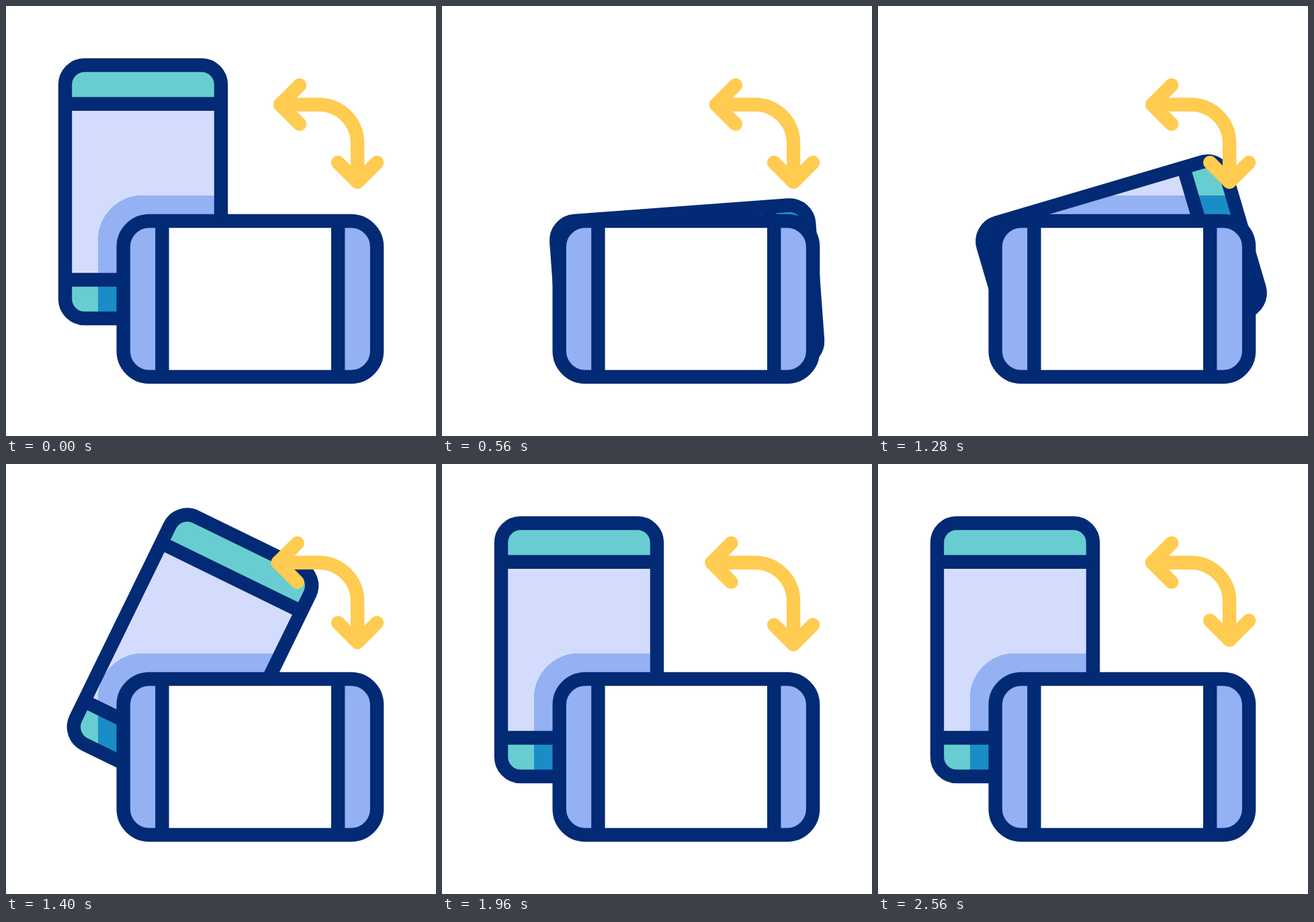
Recreate the animation shown at these times as an HTML page with a canvas. Size 640 px wide and 640 px high, loop 2.8 s.

```html
<!DOCTYPE html>
<html lang="en">
<head>
<meta charset="utf-8">
<title>Rotating phone</title>
<style>
  html, body { margin: 0; width: 100%; height: 100%; overflow: hidden; background: #fff; }
  canvas { display: block; width: 100vw; height: 100vh; }
</style>
</head>
<body>
<canvas id="stage" width="640" height="640"></canvas>
<script>
const ctx = document.getElementById('stage').getContext('2d');
const LOOP = 2800, STEP = 40, LINE = 20.4;
const NAVY = '#022a75', TEAL = '#68cdd1', DEEP = '#1b8dc6';
const SCREEN = '#d3dcfd', SHADE = '#94b1f4', YELLOW = '#ffcb50';

const clamp = v => Math.min(1, Math.max(0, v));
const smooth = s => s * s * (3 - 2 * s);
const mix = (a, b, k) => a + (b - a) * k;

// Steep ease in and out: cubic bezier (.75, 0, .25, 1)
function steep(s) {
  if (s <= 0 || s >= 1) return clamp(s);
  let lo = 0, hi = 1;
  for (let i = 0; i < 24; i++) {
    const u = (lo + hi) / 2, v = 1 - u;
    const x = 2.25 * u * v * v + 0.75 * u * u * v + u * u * u;
    if (x < s) lo = u; else hi = u;
  }
  return smooth(lo);
}

// 0 = upright, 1 = lying down
const turn = t => steep((t - 40) / 680) - steep((t - 1018) / 680);

// How far the arrow heads reach outwards, with a small rebound
function reach(t) {
  const keys = [0, 24, -6.7, 0], start = 1300, span = 427;
  const p = (t - start) / span;
  if (p <= 0 || p >= 3) return 0;
  const i = Math.floor(p);
  return mix(keys[i], keys[i + 1], smooth(p - i));
}

function roundBox(x, y, w, h, r) {
  ctx.beginPath();
  ctx.roundRect(x, y, w, h, r);
}

function line(...pts) {
  ctx.beginPath();
  pts.forEach(([x, y], i) => i ? ctx.lineTo(x, y) : ctx.moveTo(x, y));
  ctx.stroke();
}

function pose(k) {
  const swing = k * 105.77 * Math.PI / 180;
  const c = Math.cos(swing), s = Math.sin(swing);
  const dx = -19.4, dy = -140.1;
  ctx.translate(223.4 + dx * c - dy * s, 416.6 + dx * s + dy * c);
  ctx.rotate(k * Math.PI / 2);
}

function fillPhone(ends, middle) {
  ctx.fillStyle = ends;
  roundBox(-116, -188.5, 232, 377, 29);
  ctx.fill();
  ctx.fillStyle = middle;
  ctx.fillRect(-116, -130.5, 232, 261.5);
}

function backPhone(k) {
  ctx.save();
  pose(k);
  fillPhone(TEAL, SCREEN);
  ctx.restore();

  // The shade stays still while the phone turns beneath it
  ctx.save();
  roundBox(137, 282, 453, 308, 67);
  ctx.clip();
  pose(k);
  fillPhone(DEEP, SHADE);
  ctx.restore();

  ctx.save();
  pose(k);
  roundBox(-116, -188.5, 232, 377, 29);
  ctx.stroke();
  line([-116, -130.8], [116, -130.8]);
  line([-116, 131], [116, 131]);
  ctx.restore();
}

function frontPhone() {
  roundBox(174.7, 320, 377.4, 232, 38.5);
  ctx.fillStyle = SHADE;
  ctx.fill();
  ctx.fillStyle = '#fff';
  ctx.fillRect(232.4, 320, 261.8, 232);
  ctx.stroke();
  line([232.4, 320], [232.4, 552]);
  line([494.2, 320], [494.2, 552]);
}

function arrow(d) {
  const x = 408 - d, y = 262 + d;
  ctx.beginPath();
  ctx.moveTo(x, 146.7);
  ctx.lineTo(465.5, 146.7);
  ctx.arc(465.5, 204.3, 57.6, -Math.PI / 2, 0);
  ctx.lineTo(523.1, y);
  ctx.stroke();
  line([x + 29, 117.7], [x, 146.7], [x + 29, 175.7]);
  line([494.1, y - 29], [523.1, y], [552.1, y - 29]);
}

function draw(t) {
  ctx.fillStyle = '#fff';
  ctx.fillRect(0, 0, 640, 640);
  ctx.lineWidth = LINE;
  ctx.lineCap = 'butt';
  ctx.lineJoin = 'round';
  ctx.strokeStyle = NAVY;
  backPhone(turn(t));
  frontPhone();
  ctx.lineCap = 'round';
  ctx.strokeStyle = YELLOW;
  arrow(reach(t));
}

const begin = performance.now();
function tick() {
  const t = (performance.now() - begin) % LOOP;
  draw(Math.floor(t / STEP) * STEP);
  requestAnimationFrame(tick);
}
tick();
</script>
</body>
</html>
```
